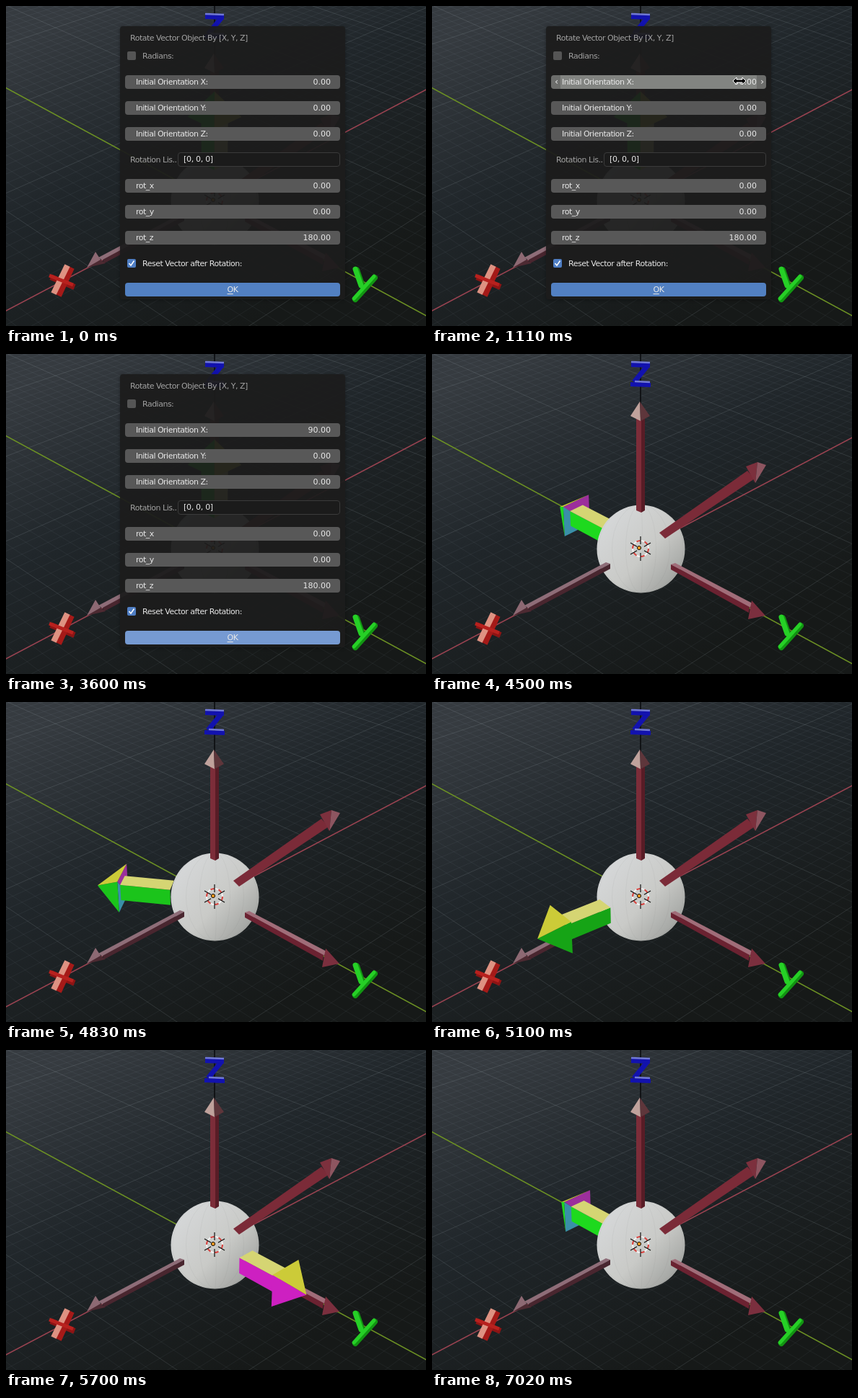
An HTML page with a canvas that plays this animation: 582 px wide and 444 px high, repeating every 7200 ms.

```html
<!DOCTYPE html>
<html lang="en">
<head>
<meta charset="utf-8">
<title>Rotate vector</title>
<style>
  html, body { margin: 0; width: 100%; height: 100%; overflow: hidden; background: #1c2021; }
  #stage { position: relative; width: 582px; height: 444px; overflow: hidden;
    font: 11px/19px "DejaVu Sans", sans-serif; letter-spacing: -.5px; color: #e8e8e8; white-space: nowrap; }
  canvas, #cursor { position: absolute; left: 0; top: 0; }
  #dialog { position: absolute; left: 158px; top: 28px; width: 312px; height: 379px;
    border-radius: 4px; background: rgba(28, 28, 28, .94); box-shadow: 0 1px 4px rgba(0, 0, 0, .35); }
  #dialog > * { position: absolute; box-sizing: border-box; }
  .dim { color: #a2a2a2; }
  .field, .ok { left: 7px; width: 298px; height: 19px; border-radius: 4px; }
  .field { background: #585858; padding: 0 13px 0 15px; overflow: hidden; }
  .field > * { position: relative; }
  .field b { float: right; font-weight: normal; letter-spacing: 0; }
  .field.hover { background: linear-gradient(90deg, #6c6d6b 13px, #828481 13px 285px, #6c6d6b 285px); }
  .field.hover::before, .field.hover::after { content: "‹"; position: absolute; left: 5px; top: -1px; font-size: 13px; }
  .field.hover::after { content: "›"; left: 290px; }
  .field.edit { background: #191919; padding-left: 8px; }
  .field.edit span, .field.edit b, .field i { display: none; }
  .field.edit i { display: inline-block; font-style: normal; letter-spacing: 0; border-right: 1px solid #71a8ff; }
  .field.edit i.selected { background: #5680c2; border: 0; }
  .list { left: 80px; top: 175px; width: 225px; height: 20px; padding-left: 7px; border: 1px solid #3b3b3b;
    border-radius: 4px; background: #1b1b1b; line-height: 18px; letter-spacing: -.3px; }
  .list.hover { background: #242424; }
  .box { left: 10px; width: 12px; height: 12px; border-radius: 2px; background: #555; }
  .ok { top: 356px; background: #5280c2; text-align: center; }
  .ok.hover { background: #769ad2; }
  .ok u { text-underline-offset: 2px; }
</style>
</head>
<body>
<div id="stage">
  <canvas id="view" width="582" height="444"></canvas>
  <div id="dialog">
    <span class="dim" style="left:14px;top:7px">Rotate Vector Object By [X, Y, Z]</span>
    <span class="box" style="top:35px"></span>
    <span class="dim" style="left:31px;top:32px">Radians:</span>
    <span class="dim" style="left:14px;top:176px">Rotation Lis..</span>
    <span class="list" data-y="213">[0, 0, 0]</span>
    <svg class="box" style="top:323px;background:#4f7ec4" viewBox="0 0 12 12"><path d="M2.5 6l2.5 3 4.5-6.5" fill="none" stroke="#fff" stroke-width="1.5"/></svg>
    <span style="left:31px;top:320px">Reset Vector after Rotation:</span>
    <div class="ok" data-y="393"><u>O</u>K</div>
  </div>
  <svg id="cursor" width="24" height="24" style="overflow:visible" fill="#fff" stroke="#000">
    <path id="pointer" d="M0 0V16L4 12.5 6.500 18.500 9 17.500 6.500 11.500H11.500Z"/>
    <path id="resize" fill="#000" stroke="#fff" d="M-9 0L-4 -5V-2H4V-5L9 0 4 5V2H-4V5Z"/>
  </svg>
</div>
<script>
const LOOP = 7200, STEP = 30;
const CX = 289, CY = 270.5, CAMERA = 1354, SIN = .535, COS = .845;
const AZIMUTH = 45.43, RAD = Math.PI / 180;
const AX = Math.cos(AZIMUTH * RAD), AY = Math.sin(AZIMUTH * RAD);
const $ = id => document.getElementById(id);
const dialog = $('dialog'), cursor = $('cursor');
const ctx = $('view').getContext('2d');

// Number fields of the dialog, by the height of their middle line
const rows = [['Initial Orientation X:', 105], ['Initial Orientation Y:', 141], ['Initial Orientation Z:', 177],
  ['rot_x', 249], ['rot_y', 285], ['rot_z', 321]];
const fields = rows.map(([label, y]) => {
  const el = document.createElement('div');
  el.className = 'field';
  el.dataset.y = y;
  el.style.top = y - 37 + 'px';
  el.innerHTML = `<b>${label === 'rot_z' ? '180.00' : '0.00'}</b><span>${label}</span><i></i>`;
  dialog.append(el);
  return el;
});
const [value, , entry] = fields[0].children;
const hoverables = dialog.querySelectorAll('[data-y]');

// World axes: r to the right, n towards the viewer, z up
const scale = (n, z) => 1 / (1 - (n * COS + z * SIN) / CAMERA);
const project = ([r, n, z]) => {
  const s = scale(n, z);
  return [CX + r * s, CY + (n * SIN - z * COS) * s];
};
const ground = (x, y) => project([y * AX - x * AY, x * AX + y * AY, 0]);
const combine = (...terms) => [0, 1, 2].map(i => terms.reduce((sum, [v, k]) => sum + v[i] * k, 0));
const dot = (a, b) => a[0] * b[0] + a[1] * b[1] + a[2] * b[2];

function poly(c, fill, ...points) {
  c.beginPath();
  points.forEach(p => c.lineTo(...p));
  c.closePath();
  c.fillStyle = fill;
  c.fill();
}
function line(c, color, width, ...points) {
  c.beginPath();
  points.forEach(p => c.lineTo(...p));
  c.strokeStyle = color;
  c.lineWidth = width;
  c.stroke();
}
function layer(paint) {
  const canvas = document.createElement('canvas');
  canvas.width = 582;
  canvas.height = 444;
  paint(canvas.getContext('2d'));
  return canvas;
}

const backdrop = layer(c => {
  const g = c.createLinearGradient(110, 0, 330, 444);
  g.addColorStop(0, '#363b40');
  g.addColorStop(.45, '#20262a');
  g.addColorStop(1, '#161918');
  c.fillStyle = g;
  c.fillRect(0, 0, 582, 444);
  for (let k = -45; k <= 45; k++) {
    const d = k * 22, color = `rgba(190,205,210,${k % 10 ? .06 : .14})`;
    line(c, color, 1, ground(d, -1100), ground(d, 1100));
    line(c, color, 1, ground(-1100, d), ground(1100, d));
  }
  line(c, '#9a4250', 1.5, ground(-1100, 0), ground(1100, 0));
  line(c, '#6c9122', 1.5, ground(0, -1100), ground(0, 1100));
  line(c, '#080a0c', 1.5, [289, 0], [289, 70]);
});

const ball = layer(c => {
  const g = c.createLinearGradient(250, 222, 345, 310);
  g.addColorStop(0, '#d5d7d8');
  g.addColorStop(.55, '#c9cac7');
  g.addColorStop(1, '#a0a29f');
  c.beginPath();
  c.arc(289.5, 270.5, 61, 0, 7);
  c.fillStyle = g;
  c.fill();
  c.save();
  c.clip();
  // faint facets
  for (let i = -3; i <= 3; i++) {
    c.beginPath();
    c.ellipse(289.5, 270, Math.abs(i) * 19 + 2, 61, 0, i < 0 ? 1.57 : -1.57, i < 0 ? 4.71 : 1.57);
    c.strokeStyle = 'rgba(90,90,85,.06)';
    c.stroke();
  }
  c.restore();
});

const props = layer(c => {
  // up
  poly(c, '#7c2d39', [283, 86], [290, 88], [290, 220], [283, 217]);
  poly(c, '#581c26', [290, 88], [295, 86], [295, 217], [290, 220]);
  poly(c, '#c0a29c', [288, 66], [275, 86], [289, 93]);
  poly(c, '#5e363b', [288, 66], [289, 93], [302, 86]);
  // back right
  poly(c, '#7b2b38', [315, 248], [437, 162], [447, 173], [323, 256]);
  poly(c, '#7c303d', [435, 156], [451, 150], [448, 179]);
  poly(c, '#8d5560', [451, 150], [463, 154], [448, 179]);
  // along X
  poly(c, '#8e6d78', [241, 289], [247, 291], [134, 353], [128, 349]);
  poly(c, '#49262f', [247, 291], [247, 298], [136, 357], [134, 352]);
  poly(c, '#8d6973', [112, 363], [124, 341], [133, 355]);
  poly(c, '#4d2a32', [112, 363], [131, 352], [138, 357]);
  // along Y
  poly(c, '#a06d79', [331, 292], [337, 290], [446, 347], [440, 352]);
  poly(c, '#6b2231', [331, 292], [440, 351], [439, 359], [331, 299]);
  poly(c, '#7b2f3e', [443, 342], [462, 363], [438, 368]);
  // letter X
  line(c, '#8d1414', 8, [62, 376], [95, 390]);
  line(c, '#a51a18', 8, [91, 363], [73, 402]);
  line(c, '#de9282', 8, [85, 360], [66, 399]);
  line(c, '#b8211e', 5, [60, 374], [93, 387]);
  // letter Y
  c.lineCap = 'round';
  line(c, '#129512', 8, [486, 366], [494, 389]);
  line(c, '#129512', 8, [511, 377], [484, 407]);
  line(c, '#26d026', 7, [484, 365], [492, 388]);
  line(c, '#26d026', 5, [510, 375], [482, 406]);
  // letter Z
  c.lineCap = 'butt';
  line(c, '#1212ae', 7, [298, 17], [280, 39]);
  line(c, '#1212ae', 6, [276, 15], [302, 16]);
  line(c, '#7078d8', 2.5, [276, 11], [302, 12]);
  line(c, '#1212ae', 6, [275, 42], [303, 43]);
  line(c, '#7078d8', 2.5, [281, 38], [302, 39]);
});

const marker = layer(c => {
  c.lineWidth = 2;
  for (let i = 0; i < 12; i++) {
    c.beginPath();
    c.arc(289, 270, 11, i * Math.PI / 6, (i + 1) * Math.PI / 6);
    c.strokeStyle = i % 2 ? '#f4f4f4' : '#d8403c';
    c.stroke();
  }
  for (const [x, y] of [[0, 17], [14, 8], [14, -8]])
    for (const s of [-1, 1])
      line(c, '#111', 1.2, [289 + s * x, 270 + s * y], [289 + s * x * .35, 270 + s * y * .35]);
  c.beginPath();
  c.arc(287, 269, 2.6, 0, 7);
  c.fillStyle = '#f09a20';
  c.fill();
  c.strokeStyle = '#111';
  c.lineWidth = 1;
  c.stroke();
});

// Square arrow pointing along u, with side directions v and w
function drawArrow(u, v, w) {
  const start = 60, neck = 131, tip = 168, thin = 12.5, wide = 25;
  const eye = [0, COS * CAMERA, SIN * CAMERA];
  const at = (a, b, c) => combine([u, a], [v, b], [w, c]);
  const face = (points, normal, fill) => {
    if (dot(normal, combine([eye, 1], [points[0], -1])) > 0) poly(ctx, fill, ...points.map(project));
  };
  const minus = d => combine([d, -1]);
  const sides = [
    [v, 1, 0, n => `hsl(120 76% ${42 - 9 * n[0]}%)`],
    [minus(v), -1, 0, n => `hsl(304 73% ${40 - 9 * n[0]}%)`],
    [w, 0, 1, (n, head) => head ? '#cccb38' : '#d5d573'],
    [minus(w), 0, -1, () => '#3aa0c0']
  ];
  const corner = (a, size, b, c, s) => at(a, size * (b || s), size * (c || s));
  const shaft = () => sides.forEach(([n, b, c, color]) => face([
    corner(start, thin, b, c, -1), corner(neck, thin, b, c, -1),
    corner(neck, thin, b, c, 1), corner(start, thin, b, c, 1)], n, color(n)));
  const head = () => {
    face([at(neck, -wide, wide), at(neck, wide, wide), at(neck, -wide, -wide)], minus(u), '#9c2f9c');
    face([at(neck, wide, -wide), at(neck, wide, wide), at(neck, -wide, -wide)], minus(u), '#3a8fa8');
    sides.forEach(([n, b, c, color]) => face([
      at(tip, 0, 0), corner(neck, wide, b, c, -1), corner(neck, wide, b, c, 1)],
      combine([n, tip - neck], [u, wide]), color(n, true)));
  };
  const order = dot(u, eye) < 0 ? [head, shaft] : [shaft, head];
  order.forEach(part => part());
}

// Value between keyed times
function track(t, keys) {
  const i = keys.findIndex(k => t < k[0]);
  if (i < 0) return keys[keys.length - 1].slice(1);
  if (!i) return keys[0].slice(1);
  const [a, b] = [keys[i - 1], keys[i]], f = (t - a[0]) / (b[0] - a[0]);
  return a.slice(1).map((x, j) => x + (b[j + 1] - x) * f);
}
const turn = [[4470, 0], [4620, 5], [4830, 35], [5340, 125], [5700, 180]];
const mousePath = [[30, 580, 172], [60, 548, 144], [240, 440, 107], [330, 426, 104], [1110, 426, 104],
  [1710, 383, 386], [1800, 382, 387], [1950, 382, 387], [2070, 520, 450]];

function drawScene(t) {
  const open = t < 4470;
  const angle = t < 6600 ? track(t, turn)[0] : 0;
  const a = (angle - AZIMUTH) * RAD;
  const arrow = () => open
    ? drawArrow([0, 0, 1], [-AY, AX, 0], [AX, AY, 0])
    : drawArrow([-Math.cos(a), Math.sin(a), 0], [Math.sin(a), Math.cos(a), 0], [0, 0, 1]);
  const behind = !open && Math.sin(a) < 0;
  ctx.drawImage(backdrop, 0, 0);
  if (behind) arrow();
  ctx.drawImage(ball, 0, 0);
  ctx.drawImage(props, 0, 0);
  if (!behind) arrow();
  ctx.drawImage(marker, 0, 0);
}

function drawDialog(t) {
  dialog.style.display = t < 4470 ? '' : 'none';
  const editing = t >= 330 && t < 990;
  const [x, y] = track(t, mousePath);
  const pointY = t >= 1710 ? 393 : y;
  let overField = false;
  hoverables.forEach(el => {
    const on = !editing && t >= 60 && (x < 463 || t >= 1710) && Math.abs(pointY - el.dataset.y) < 10;
    el.classList.toggle('hover', on);
    if (on && el.classList.contains('field')) overField = true;
  });
  fields[0].classList.toggle('edit', editing);
  value.textContent = t < 990 ? '0.00' : '90.00';
  entry.textContent = t < 690 ? '0.0' : t < 750 ? '9' : '90';
  entry.className = t < 690 ? 'selected' : '';
  cursor.style.display = t < 60 || editing || t >= 2070 ? 'none' : '';
  cursor.style.transform = `translate(${x}px,${y}px)`;
  $('resize').style.display = overField ? '' : 'none';
  $('pointer').style.display = overField ? 'none' : '';
}

const began = performance.now();
function frame() {
  const t = Math.floor((performance.now() - began) % LOOP / STEP) * STEP;
  drawScene(t);
  drawDialog(t);
  requestAnimationFrame(frame);
}
frame();
</script>
</body>
</html>
```
